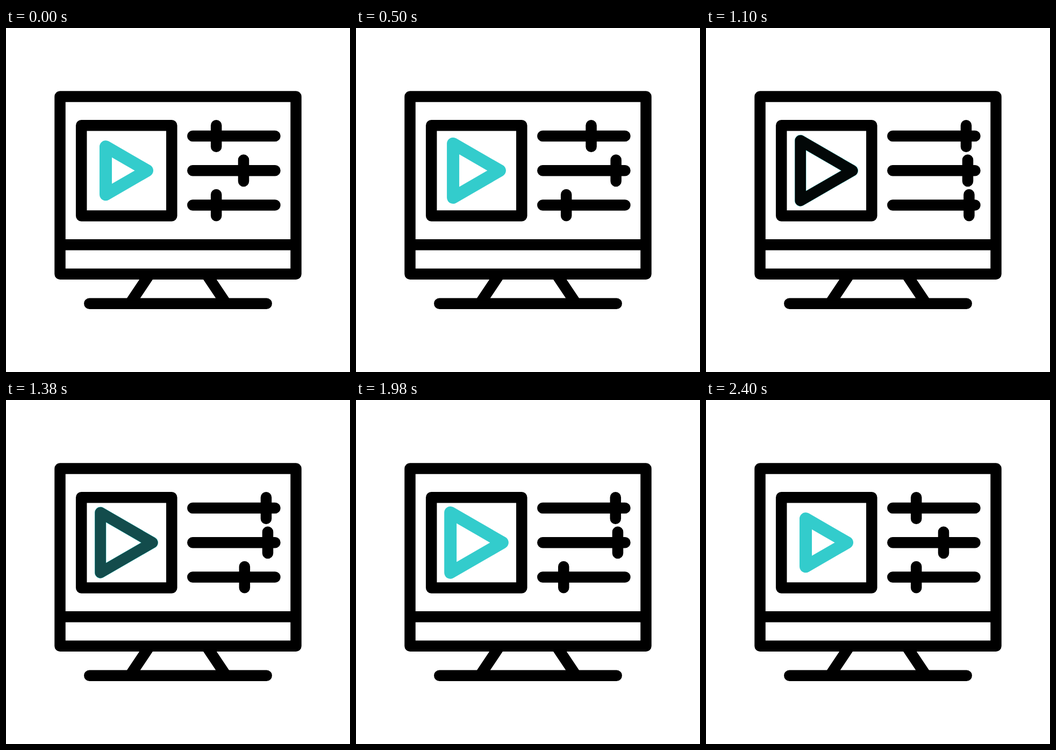
Animation of 640x640 px, one loop 2820 ms. Source, as an HTML page:

```html
<!DOCTYPE html>
<html lang="en">
<head>
<meta charset="utf-8">
<title>Video editing</title>
<style>
  html, body { margin: 0; width: 100%; height: 100%; overflow: hidden; background: #fff; }
  svg { display: block; width: 100%; height: 100%; }
  path { fill: none; stroke: #000; stroke-width: 20.5; stroke-linecap: round; stroke-linejoin: round; }
  #play { stroke: #3cc; }
</style>
</head>
<body>
<svg viewBox="0 0 640 640">
  <path d="M100.5 127.4H539.5V457.7H100.5ZM100.5 403.2H539.5"/>
  <path d="M155.3 512.8H484.7M265.9 460L233.7 508M374.1 460L406.3 508"/>
  <path d="M140.2 181.2H308.3V349.5H140.2Z"/>
  <path id="sliders"/>
  <path id="play"/>
  <path id="shade"/>
</svg>
<script>
const LOOP = 2820, STEP = 20;
const [sliders, play, shade] = ['sliders', 'play', 'shade'].map(id => document.getElementById(id));

// Smooth progress from 0 to 1 between two times.
function ease(t, from, to) {
  const u = Math.min(1, Math.max(0, (t - from) / (to - from)));
  return u * u * (3 - 2 * u);
}

// A rail with its knob; row 0 is the top one.
function slider(x, row) {
  const y = 201 + 64.3 * row;
  return `M347.3 ${y}H500.5M${x} ${y - 19.7}v39.4`;
}

function triangle(size) {
  const w = 38.5 * size, h = 44.5 * size;
  return `M${224 - w} ${265.3 - h}L${224 + w} 265.3L${224 - w} ${265.3 + h}Z`;
}

function draw(now) {
  const t = Math.floor((now % LOOP) / STEP) * STEP;
  const grow = ease(t, 200, 800), shrink = ease(t, 2000, 2400);
  const rise = ease(t, 640, 1160), fall = ease(t, 1160, 1690);
  const dark = rise - fall;

  const knobs = [
    391.2 + 92.8 * (grow - ease(t, 1950, 2400)),
    442 + 45 * (ease(t, 0, 600) - shrink),
    391.2 + 102 * rise - 132 * fall + 30 * ease(t, 1690, 2080)
  ];
  sliders.setAttribute('d', knobs.map(slider).join(''));

  const outline = triangle(1 + 0.255 * (grow - shrink));
  play.setAttribute('d', outline);
  play.style.strokeWidth = dark > 0 ? 21.3 : 23;
  shade.setAttribute('d', outline);
  shade.setAttribute('stroke-opacity', dark);
}

let start;
function tick(now) {
  start ??= now;
  draw(now - start);
  requestAnimationFrame(tick);
}
draw(0);
requestAnimationFrame(tick);
</script>
</body>
</html>
```
